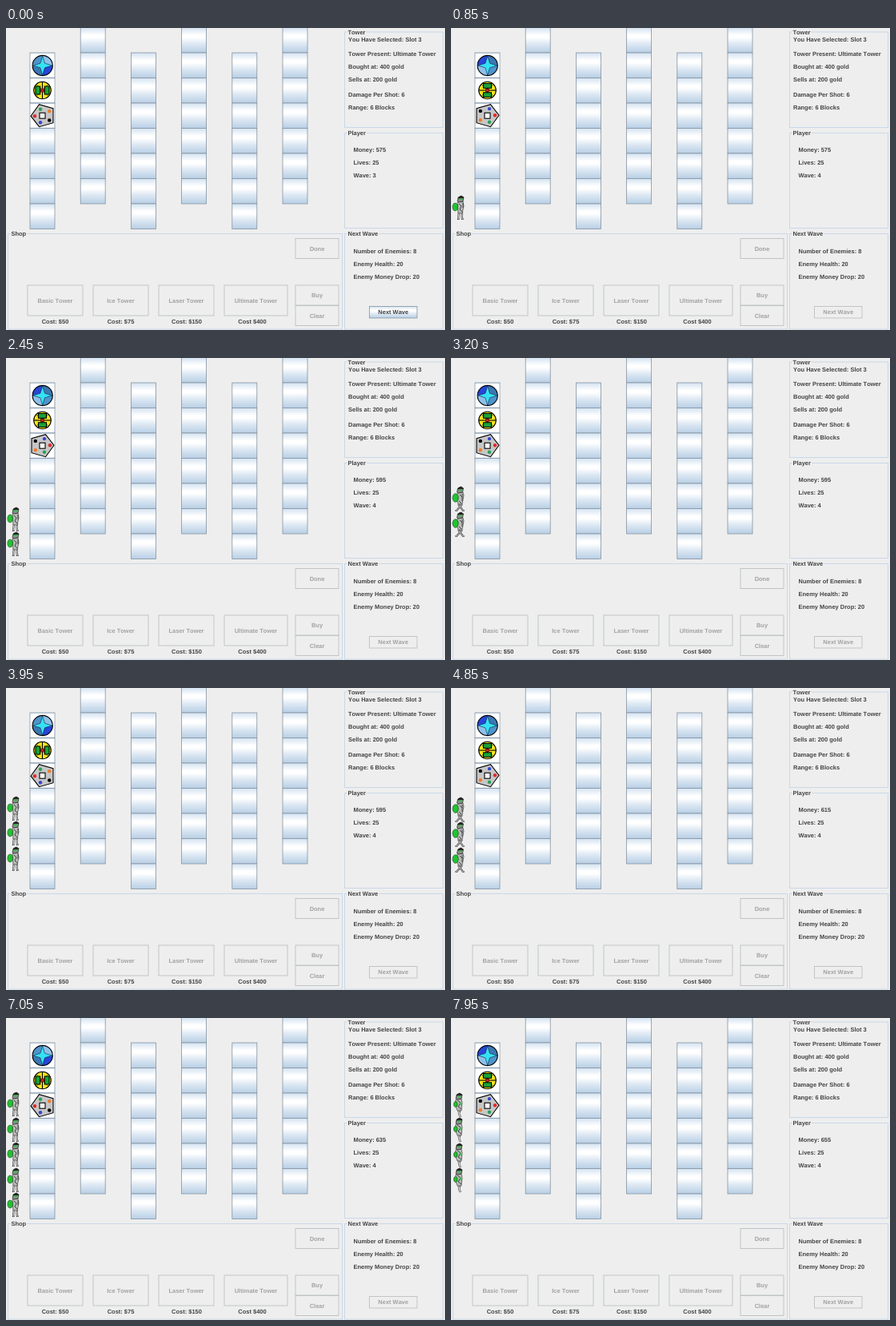
An HTML page that plays this animation: 549 px wide and 378 px high, repeating every 8000 ms.

```html
<!DOCTYPE html>
<html lang="en">
<head>
<meta charset="utf-8">
<title>Tower defence</title>
<style>
html, body { margin: 0; width: 100%; height: 100%; overflow: hidden; background: #eee; }
svg { display: block; width: 549px; height: 378px; }
text { font: bold 7.47px "Liberation Sans", Arial, sans-serif; font-kerning: none; fill: #444; text-rendering: geometricPrecision; }
.mid { text-anchor: middle; }
.off { fill: #a2a2a2; }
.panel { fill: none; stroke: #c9d8e8; }
.cell { fill: url(#ocean); stroke: #8593a1; stroke-width: .8; }
.button { fill: #eee; stroke: #bcc0c4; stroke-width: .9; }
.ink { stroke: #000; stroke-width: 1.1; }
.fine { stroke: #222; stroke-width: .8; fill: none; }
.limb { stroke: #444; stroke-width: 2.2; fill: none; }
.bone { stroke: #ddd; stroke-width: .9; fill: none; }
.body { fill: #b9bbb9; stroke: #444; stroke-width: .7; }
.shell { fill: #1fc52f; stroke: #275c2b; stroke-width: .8; }
.head { fill: #8d8f8d; stroke: #222; stroke-width: .7; }
.visor { stroke: #2fc040; stroke-width: 1.6; }
</style>
</head>
<body>
<svg id="stage" viewBox="0 0 549 378">
  <defs>
    <linearGradient id="ocean" x1="0" y1="0" x2="0" y2="1">
      <stop offset="0" stop-color="#d3e2f1"/>
      <stop offset=".3" stop-color="#fff"/>
      <stop offset=".4" stop-color="#fff"/>
      <stop offset=".65" stop-color="#dde8f3"/>
      <stop offset="1" stop-color="#b8cfe5"/>
    </linearGradient>
    <g id="helmet">
      <path d="M7 7L8 2 12 0 15 2 14 7 9 8Z" class="head"/>
      <path d="M7.5 3.5L9 1 12 0 15 2V3" fill="#222"/>
      <path d="M9 4.3H13.5" class="visor"/>
    </g>
    <g id="pose0">
      <path d="M13 22L6 30H4M8 22L14 30H16" class="limb"/>
      <path d="M13 22L6 30H4M8 22L14 30H16" class="bone"/>
      <path d="M7 8L14 7 15 11 13 22 8 22 6 15Z" class="body"/>
      <path d="M10 10L13 13M13 9V18M9 18L12 21" class="fine"/>
      <ellipse cx="4.6" cy="14" rx="3.6" ry="5.2" class="shell"/>
      <use href="#helmet" x="-.5"/>
    </g>
    <g id="pose1">
      <path d="M9 20L8 29H10M13 20L12.5 25 13 29H15" class="limb"/>
      <path d="M9 20L8 29H10M13 20L12.5 25 13 29H15" class="bone"/>
      <path d="M7 8L14 7 15 13 13 22 8 22Z" class="body"/>
      <path d="M9 10L12 13 10 17 13 20M14 9V15" class="fine"/>
      <ellipse cx="4.2" cy="14" rx="3.2" ry="4.8" class="shell"/>
      <use href="#helmet"/>
    </g>
    <g id="pose2">
      <path d="M8 20L10 29M11 20L9 26 11 30" class="limb"/>
      <path d="M8 20L10 29M11 20L9 26 11 30" class="bone"/>
      <path d="M5 8L12 7 13 12 12 22 7 22 4 15Z" class="body"/>
      <path d="M7 9L11 12 8 17 12 20" class="fine"/>
      <ellipse cx="4.8" cy="14" rx="2.3" ry="3.4" class="shell"/>
      <path d="M10 12L12 15" class="visor"/>
      <use href="#helmet" x="-2"/>
    </g>
  </defs>
  <g id="board"></g>
  <g id="towers">
    <g id="ice">
      <circle r="12.6" fill="#4f94cc"/>
      <path d="M0 0V-12.6A12.6 12.6 0 0 1 12.6 0Z" fill="#8fc0ea"/>
      <path d="M0 0H12.6A12.6 12.6 0 0 1 0 12.6Z" fill="#2846d8"/>
      <path d="M0 0V12.6A12.6 12.6 0 0 1-12.6 0Z" fill="#3b78b2"/>
      <path d="M0-12L2.8-2.8 12 0 2.8 2.8 0 12-2.8 2.8-12 0-2.8-2.8Z" fill="#35e2f4" stroke="#124" stroke-width=".6"/>
      <circle r="12.6" fill="none" class="ink"/>
    </g>
    <g id="laser">
      <circle r="10.8" fill="#f6e51c" class="ink"/>
      <path d="M-7.6-7.6L7.6 7.6M-7.6 7.6L7.6-7.6" class="fine"/>
      <path d="M0-10.8V10.8" class="ink"/>
      <path d="M-8.5-5H-2.8V5H-8.5ZM2.8-5H8.5V5H2.8Z" fill="#18a238" class="ink"/>
      <path d="M-3 0H3" class="ink"/>
      <rect x="-1.6" y="-2" width="3.2" height="4" fill="#d32222" stroke="#400" stroke-width=".6"/>
    </g>
    <g id="ultimate">
      <path d="M-14.5 .5L-4-14 13.5-9V9L-4 14Z" fill="#c6c6c6" class="ink"/>
      <rect x="-3.5" y="-3.5" width="7" height="7" fill="#fff" class="ink"/>
      <circle cx="-9.5" cy=".5" r="2.2" fill="#e32828"/>
      <circle cx="-2.5" cy="-8" r="2.2" fill="#25a455"/>
      <circle cx="8.7" cy="-5.5" r="2.2" fill="#ef7d2d"/>
      <circle cx="8.7" cy="5.8" r="2.2" fill="#000"/>
      <circle cx="-2.5" cy="8.6" r="2.2" fill="#3546d0"/>
    </g>
  </g>
  <g id="enemies"></g>
</svg>
<script>
const LOOP = 8000, CELL = 31.5;
const WAVE_START = 550, SPEED = 0.03406, SPAWN_Y = 220, ENEMIES = 8;
const FIRST_KILL = 2380, KILL_GAP = 1650, REWARD = 20;
const TURN = 300, STEP = 103;
const WALK = [0, 1, 2, 1];

const $ = id => document.getElementById(id);
const board = $('board');

function add(parent, tag, attrs, content = '') {
  const node = document.createElementNS('http://www.w3.org/2000/svg', tag);
  for (const key in attrs) node.setAttribute(key, attrs[key]);
  node.textContent = content;
  return parent.appendChild(node);
}
const rect = (cls, x, y, width, height) => add(board, 'rect', { class: cls, x, y, width, height });
const label = (x, y, str, cls = '') => add(board, 'text', { x, y, class: cls }, str);

function panel(title, x, y, width, height) {
  rect('panel', x, y, width, height);
  const text = label(x + 4, y + 2.6, title);
  const gap = rect('', x + 3, y - 2, text.getComputedTextLength() + 2, 4);
  gap.setAttribute('fill', '#eee');
  board.append(text);
}
function button(str, x, y, width, height) {
  const box = rect('button', x, y, width, height);
  const text = label(x + width / 2, y + height / 2 + 2.5, str, 'mid off');
  return { box, text };
}

for (let col = 0; col < 6; col++)
  for (let row = 0; row < 7; row++) {
    const x = 30 + col * 63.2, y = (col % 2 ? -0.5 : 31) + row * CELL;
    rect('cell', x, y, 31, CELL);
    if (col === 0 && row < 3) rect('', x + .7, y + 1, 29.6, CELL - 1.8).setAttribute('fill', '#fff');
  }

panel('Tower', 423.5, 5, 123, 119.5);
panel('Player', 423.5, 131.5, 123, 119);
panel('Next Wave', 423.5, 257.5, 123, 119.5);
panel('Shop', 2.5, 257.5, 418, 119.5);

label(428, 16.6, 'You Have Selected: Slot 3');
label(428, 35.4, 'Tower Present: Ultimate Tower');
label(428, 51.2, 'Bought at: 400 gold');
label(428, 67, 'Sells at: 200 gold');
label(428, 86, 'Damage Per Shot: 6');
label(428, 101.8, 'Range: 6 Blocks');
const money = label(434.5, 155.4, '');
label(434.5, 171.2, 'Lives: 25');
const wave = label(434.5, 187, '');
label(434.5, 282, 'Number of Enemies: 8');
label(434.5, 297.8, 'Enemy Health: 20');
label(434.5, 313.6, 'Enemy Money Drop: 20');

button('Basic Tower', 27, 322, 69, 38);
button('Ice Tower', 109, 322, 69, 38);
button('Laser Tower', 191, 322, 69, 38);
button('Ultimate Tower', 273, 322, 79, 38);
button('Done', 362, 263.5, 54, 25);
button('Buy', 362, 322, 54, 25);
button('Clear', 362, 347.5, 54, 25);
const nextWave = button('Next Wave', 454.5, 348.5, 59.5, 14.5);
['Cost: $50', 'Cost: $75', 'Cost: $150', 'Cost $400'].forEach((str, i) =>
  label([61.5, 143.5, 226, 308][i], 370.4, str, 'mid'));

const enemies = Array.from({ length: ENEMIES }, () => add($('enemies'), 'use', {}));

const place = (id, x, y, angle) => $(id).setAttribute('transform', `translate(${x} ${y}) rotate(${angle})`);

function draw(t) {
  const started = t >= WAVE_START;
  const kills = t < FIRST_KILL ? 0 : 1 + Math.floor((t - FIRST_KILL) / KILL_GAP);
  money.textContent = 'Money: ' + (575 + kills * REWARD);
  wave.textContent = 'Wave: ' + (started ? 4 : 3);
  nextWave.box.setAttribute('class', started ? 'button' : 'cell');
  nextWave.text.setAttribute('class', started ? 'mid off' : 'mid');

  const turned = started && Math.floor((t + 270) / TURN) % 2;
  place('ice', 45.7, 47, turned ? 180 : 0);
  place('laser', 45.5, 78, turned ? 90 : 0);
  place('ultimate', 45.5, 109.7, turned ? 180 : 0);

  const pose = WALK[Math.round((t - 1550) / STEP + 400) % 4];
  enemies.forEach((enemy, i) => {
    const y = SPAWN_Y + i * CELL - (t - WAVE_START) * SPEED;
    const alive = started && i >= kills && y <= SPAWN_Y;
    enemy.setAttribute('visibility', alive ? 'visible' : 'hidden');
    enemy.setAttribute('href', '#pose' + pose);
    enemy.setAttribute('transform', `translate(1 ${Math.round(y)})`);
  });
}

const origin = performance.now();
function tick() {
  draw((performance.now() - origin) % LOOP);
  requestAnimationFrame(tick);
}
draw(0);
requestAnimationFrame(tick);
</script>
</body>
</html>
```
